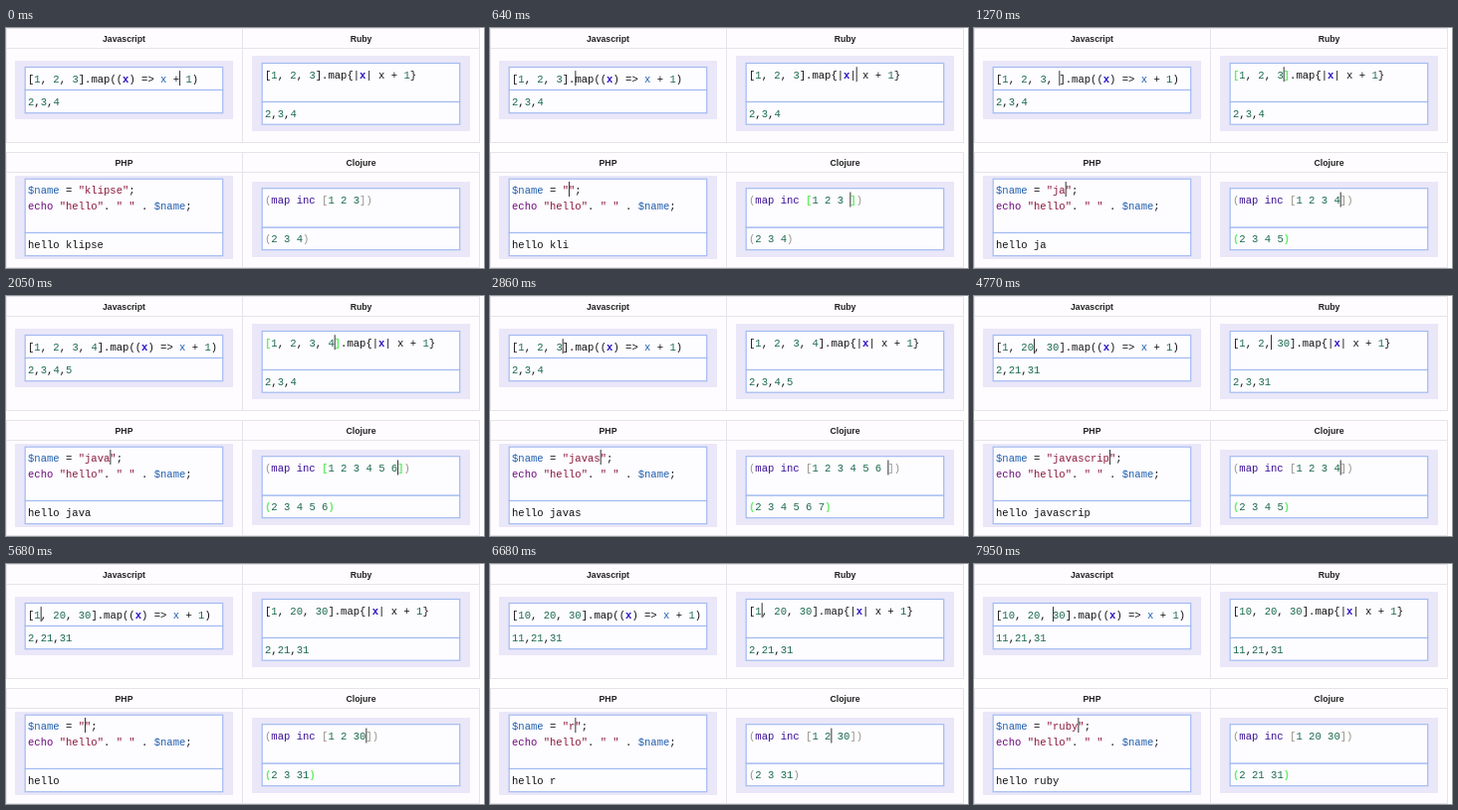
Write an HTML page that moves like this. It is 480 px wide and 242 px high and loops after 8 s.

```html
<!DOCTYPE html>
<html lang="en">
<head>
<meta charset="utf-8">
<title>Live code editors</title>
<style>
html, body { margin: 0; width: 100%; height: 100%; overflow: hidden; background: #fff; }
svg { display: block; width: 480px; height: 242px; }
text { white-space: pre; }
.title { font: bold 8.7px "Liberation Sans", Arial, sans-serif; text-anchor: middle; fill: #222; }
.code { font: 10.557px "Liberation Mono", "Courier New", monospace; fill: #111; }
.grid { fill: #fefcfe; stroke: #e6e4e8; }
.frame { fill: #e9e7f8; }
.box { fill: #fdfcff; stroke: #a3bbf0; stroke-width: 1.2; }
.caret { fill: #333; }
.strong { font-weight: bold; }
</style>
</head>
<body>
<svg id="stage" viewBox="0 0 480 242"></svg>
<script>
const LOOP = 8000, BLINK = 530, LAG = 250, CHAR = 6.335;
const INK = '#111', GREEN = '#1c6b4c', BLUE = '#1f5fae', MATCH = '#66ee66';
const left = n => '←'.repeat(n), right = n => '→'.repeat(n), erase = n => '⌫'.repeat(n);

const numbersIn = code => code.match(/\[(.*?)\]/)[1].match(/\d+/g).map(n => +n + 1);
const commaList = code => numbersIn(code).join(',');
const number = [/\d+/, GREEN];
const argument = [/(?<=[(|])x/, '#2a14c4', 'strong'];

// keys: [start ms, keystrokes, ms between keystrokes]
const panels = [
  {
    title: 'Javascript', titleAt: [118.5, 14], frame: [9, 33, 219, 59], box: [19, 39.3, 62.3, 85.5],
    x: 22, lines: [54.6], outY: 77.8,
    code: '[1, 2, 3].map((x) => x + 1)', col: 24, active: 0,
    rules: [number, argument, [/x/, BLUE]],
    run: commaList,
    keys: [[40, left(16), 45], [1000, ', 4', 220], [2200, erase(3), 150], [2950, '0'],
      [3600, left(4), 80], [4300, '0'], [5000, left(4), 90], [5800, '0'], [7500, right(6), 70]]
  },
  {
    title: 'Ruby', titleAt: [356.5, 14], frame: [247, 28, 219, 76], box: [257, 35.3, 74.3, 97],
    x: 260, lines: [50.7], outY: 89.5,
    code: '[1, 2, 3].map{|x| x + 1}', col: 24, active: -600, matches: true,
    rules: [number, argument],
    run: commaList,
    keys: [[300, left(16), 55], [1500, ', 4', 200], [3100, erase(3), 150], [4050, '0'],
      [4530, left(4), 100], [5150, '0'], [6200, left(4), 120], [7000, '0']]
  },
  {
    title: 'PHP', titleAt: [118.5, 138.5], frame: [9, 149, 219, 84], box: [19, 152, 206.3, 229.5],
    x: 22, lines: [166.5, 182.7], outY: 222,
    code: '$name = "klipse";', col: 15, active: -600, tail: 'echo "hello". " " . $name;',
    rules: [[/"[^"]*"/, '#8a1a3a'], [/\$name/, BLUE], [/echo/, '#6a0a78']],
    outRules: [],
    run: code => 'hello ' + code.match(/"(.*)"/)[1],
    keys: [[150, erase(6), 90], [850, 'ja', 130], [1550, 'va', 250], [2400, 's'], [3200, 'crip', 210],
      [4080, 't'], [4400, erase(1)], [4900, erase(9), 60], [6300, 'r'], [7000, 'uby', 260]]
  },
  {
    title: 'Clojure', titleAt: [356.5, 138.5], frame: [247, 155, 219, 76], box: [257, 161.5, 201, 223.5],
    x: 260, lines: [177], outY: 215.7,
    code: '(map inc [1 2 3])', col: 15, active: -600, matches: true,
    rules: [number, [/[()[\]]/, '#949488'], [/map|inc/, '#3a1098']],
    run: code => `(${numbersIn(code).join(' ')})`, flashOut: 760,
    keys: [[500, ' 4', 400], [1400, ' 5', 250], [1850, ' 6', 200], [2490, ' 7', 410],
      [3850, erase(1)], [4000, erase(5), 100], [4900, erase(2), 150], [5400, '0'],
      [6300, left(3), 100], [7000, '0']]
  }
];

function press({ code, col }, key) {
  if (key === '←') return { code, col: col - 1 };
  if (key === '→') return { code, col: col + 1 };
  if (key === '⌫') return { code: code.slice(0, col - 1) + code.slice(col), col: col - 1 };
  return { code: code.slice(0, col) + key + code.slice(col), col: col + 1 };
}

function record(panel) {
  let state = { code: panel.code, col: panel.col };
  panel.states = [{ ...state, at: panel.active }];
  panel.outputs = [{ text: panel.run(state.code), at: -LOOP }];
  for (const [start, strokes, gap = 0] of panel.keys) {
    [...strokes].forEach((key, i) => {
      const at = start + i * gap;
      state = press(state, key);
      panel.states.push({ ...state, at });
      const text = panel.run(state.code);
      if (text !== panel.outputs.at(-1).text) panel.outputs.push({ text, at: at + LAG });
    });
  }
}

const latest = (list, t) => list.findLast(item => item.at <= t);
const escapeText = s => s.replace(/&/g, '&amp;').replace(/</g, '&lt;').replace(/>/g, '&gt;');

function highlight(text, rules, lit = []) {
  if (!rules.length) return escapeText(text);
  const pattern = new RegExp(rules.map(([re]) => `(${re.source})`).join('|') + '|[[\\]]', 'g');
  let html = '', end = 0;
  for (const m of text.matchAll(pattern)) {
    const rule = rules.find((_, i) => m[i + 1] !== undefined) ?? [null, INK];
    const [, color, cls = ''] = lit.includes(m.index) ? [null, MATCH, 'strong'] : rule;
    html += escapeText(text.slice(end, m.index)) +
      `<tspan class="${cls}" fill="${color}">${escapeText(m[0])}</tspan>`;
    end = m.index + m[0].length;
  }
  return html + escapeText(text.slice(end));
}

const rect = (cls, x, y, w, h) => `<rect class="${cls}" x="${x}" y="${y}" width="${w}" height="${h}"/>`;
const label = (cls, x, y, body = '') => `<text class="${cls}" x="${x}" y="${y}">${body}</text>`;

function panelMarkup(p) {
  const [x, top, middle, bottom] = p.box;
  return label('title', ...p.titleAt, p.title) + rect('frame', ...p.frame) +
    rect('box', x + .2, top + .2, 198.5, middle - top) +
    rect('box', x + .2, middle + .2, 198.5, bottom - middle) +
    label('code input', p.x, p.lines[0]) +
    (p.tail ? label('code', p.x, p.lines[1], highlight(p.tail, p.rules)) : '') +
    label('code output', p.x, p.outY) +
    rect('caret', p.x, p.lines[0] - 11.5, 1, 15);
}

const cells = [[0, 20, 95], [125, 20, 96]].map(([y, head, body]) =>
  [0, 237].map(x => rect('grid', x + .5, y + .5, x ? 238 : 237, head) +
    rect('grid', x + .5, y + head + .5, x ? 238 : 237, body)).join('')).join('');

const stage = document.getElementById('stage');
stage.innerHTML = cells + panels.map(p => `<g>${panelMarkup(p)}</g>`).join('');
panels.forEach((p, i) => {
  const group = stage.querySelectorAll('g')[i];
  for (const part of ['input', 'output', 'caret']) p[part] = group.querySelector('.' + part);
  record(p);
});

function setHtml(node, html) {
  if (node.shown !== html) node.innerHTML = node.shown = html;
}

function draw(t) {
  for (const p of panels) {
    const { code, col, at } = latest(p.states, t);
    const out = latest(p.outputs, t);
    const lit = p.matches && code[col] === ']' && t - at < 200 ? [code.indexOf('['), col] : [];
    const outLit = t - out.at < p.flashOut ? [0, out.text.length - 1] : [];
    setHtml(p.input, highlight(code, p.rules, lit));
    setHtml(p.output, highlight(out.text, p.outRules ?? p.rules, outLit));
    p.caret.setAttribute('x', (p.x + col * CHAR).toFixed(2));
    p.caret.setAttribute('visibility', Math.floor((t - at) / BLINK) % 2 ? 'hidden' : 'visible');
  }
}

const began = performance.now();
function tick() {
  draw((performance.now() - began) % LOOP);
  requestAnimationFrame(tick);
}
tick();
</script>
</body>
</html>
```
